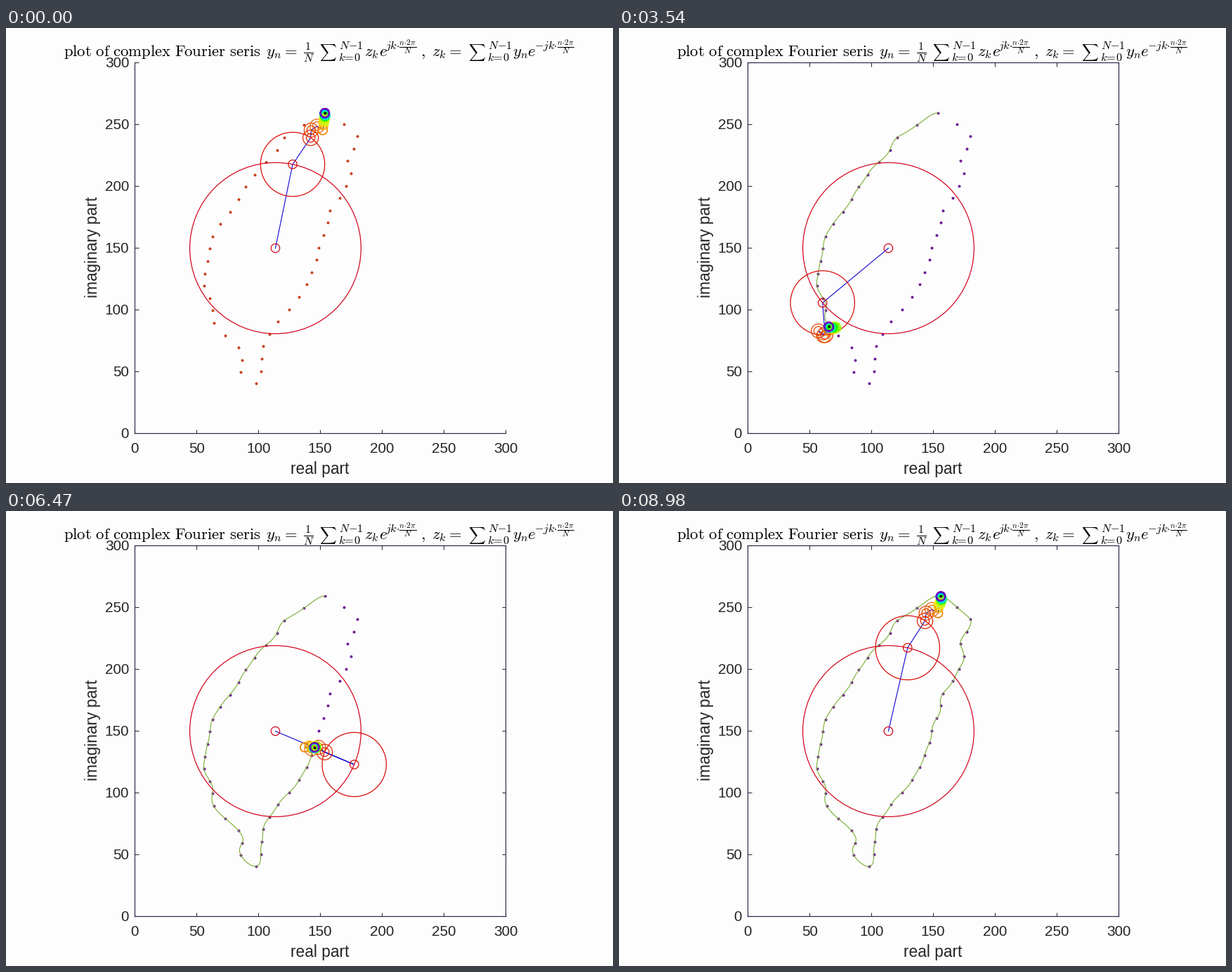
These frames come from a looping animation (864 by 648 pixels, 9020 ms). A matplotlib script:

```python
import numpy as np
import matplotlib.pyplot as plt
from matplotlib.animation import FuncAnimation
from matplotlib.collections import EllipseCollection
from matplotlib.colors import hsv_to_rgb

W, H, DPI = 864, 648, 72          # at 72 dpi one point is one pixel
STEPS = 270                       # poses in one turn
FRAMES, LOOP = STEPS + 1, 9020    # the last pose is held for one more tick
N = 44

plt.rcParams.update({
    "font.family": "Liberation Sans",
    "mathtext.fontset": "cm",
})

# Outline: steady steps of 10 down one side and up the other
xs = [154, 137, 121, 115, 106, 97, 90, 84, 77, 69, 63,
      61, 59, 57, 56, 61, 63, 64, 73, 84, 87, 86,
      98, 102, 103, 104, 109, 116, 125, 133, 139, 143, 147,
      149, 153, 156, 158, 166, 171, 175, 172, 177, 180, 169]
n = np.arange(N)
ys = np.where(n < 22, 259 - 10 * n, 10 * n - 180)
pts = np.array(xs) + 1j * ys

# Rotating arms, longest first
coef = np.fft.fft(pts) / N
order = 1 + np.argsort(-np.round(np.abs(coef[1:]), 8), kind="stable")
freq = np.where(order <= N // 2, order, order - N)
arms = coef[order]
radii = np.abs(arms)

turn = 2 * np.pi * np.arange(STEPS) / STEPS
spin = arms * np.exp(1j * np.outer(turn, freq))
joints = coef[0] + np.hstack([np.zeros((STEPS, 1)), np.cumsum(spin, axis=1)])
trail = joints[:, -1]

k = np.arange(N)
hues = np.minimum(k / N - 0.02, 0.77) % 1
vals = np.interp(k, [0, 8, 28, 36], [0.82, 1, 0.95, 0.7])
colors = hsv_to_rgb(np.column_stack([hues, np.ones(N), vals]))

INK, EDGE, PAPER = "#262626", "#33284d", "#fdfdfd"
DOT_START, DOT = "#c8401a", "#6f1a96"

fig = plt.figure(figsize=(W / DPI, H / DPI), dpi=DPI, facecolor=PAPER)
ax = fig.add_axes([183.06 / W, 0.11, 528.12 / W, 0.815], facecolor="none")
ax.set(xlim=(0, 300), ylim=(0, 300),
       xticks=range(0, 301, 50), yticks=range(0, 301, 50))
ax.tick_params(direction="in", length=5.5, width=1.1, color=EDGE,
               labelcolor=INK, labelsize=20.8)
ax.tick_params(axis="x", pad=13)
ax.tick_params(axis="y", pad=8)
for side in ax.spines.values():
    side.set(color=EDGE, linewidth=1.2)


def put(x, y, s, size, **kw):
    kw = {"ha": "left", "va": "baseline", "color": "black", **kw}
    fig.text(x / W, 1 - y / H, s, fontsize=size, **kw)


put(447.1, 635, "real part", 22.8, ha="center", color=INK)
put(123.7, 312.5, "imaginary part", 22.8, ha="center", va="center",
    rotation=90, color=INK)

# Formula in the heading
BASE, BIG, SMALL = 40, 22.7, 16.3


def math(x, s):
    put(x, BASE, f"${s}$", BIG)


def total(x):
    put(x, BASE + 0.7, r"$\sum$", 0.73 * BIG)
    put(x + 28, 30, r"$N{-}1$", SMALL)
    put(x + 27, 47, r"$k\!=\!0$", SMALL)


def power(x, sign=""):
    math(x, "e")
    put(x + 9.5, 31, rf"${sign}jk{{\cdot}}\frac{{n{{\cdot}}2\pi}}{{N}}$", SMALL)


math(81.9, r"\mathrm{plot\ of\ complex\ F\hspace{-0.083}ourier\ seris}")
math(370, "y_n =")
math(423, r"\frac{1}{N}")
total(446)
math(509.5, "z_k")
power(531)
math(590, ",")
math(606, "z_k =")
total(658)
math(721, "y_n")
power(742, "{-}")

# Moving parts
dots, = ax.plot(pts.real, pts.imag, "o", ms=4, mew=0, color=DOT, zorder=2)
path, = ax.plot([], [], color="#77ac30", lw=1.1, zorder=3)
rods, = ax.plot([], [], color="#1000d0", lw=1.1, zorder=4)
rings = EllipseCollection(2 * radii, 2 * radii, np.zeros(N - 1), units="xy",
                          offsets=np.zeros((N - 1, 2)),
                          offset_transform=ax.transData, facecolors="none",
                          edgecolors=colors[:-1], linewidths=1.2, zorder=5)
ax.add_collection(rings)
knobs = ax.scatter(np.zeros(N), np.zeros(N), s=12.4 ** 2, facecolors="none",
                   edgecolors=colors, linewidths=1.2, zorder=6)
tip, = ax.plot([], [], "o", ms=4, mew=0, color="black", zorder=7)


def xy(z):
    return np.column_stack([z.real, z.imag])


def update(frame):
    i = min(frame, STEPS - 1)
    boxed = i > 0
    for side in ("top", "right"):
        ax.spines[side].set_visible(boxed)
    ax.tick_params(top=boxed, right=boxed)
    dots.set_color(DOT if boxed else DOT_START)

    z = joints[i]
    path.set_data(trail[:i + 1].real, trail[:i + 1].imag)
    rods.set_data(z.real, z.imag)
    rings.set_offsets(xy(z[:-1]))
    knobs.set_offsets(xy(z))
    tip.set_data([z[-1].real], [z[-1].imag])
    return path, rods, rings, knobs, tip, dots


anim = FuncAnimation(fig, update, frames=FRAMES, interval=LOOP / FRAMES,
                     repeat=True, repeat_delay=0, blit=False)
plt.show()
```
